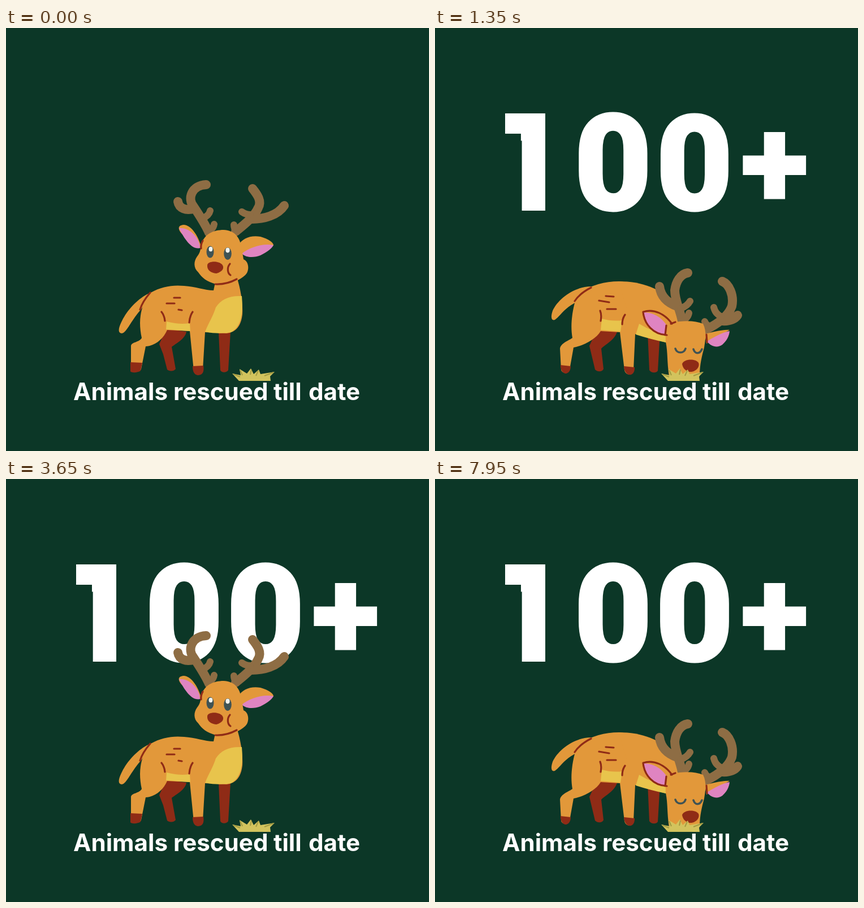
An HTML page for the animation above (8 s loop, 748 by 748 pixels).

```html
<!DOCTYPE html>
<html lang="en">
<head>
<meta charset="utf-8">
<title>Animals rescued till date</title>
<style>
html, body { margin: 0; width: 100%; height: 100%; overflow: hidden; background: #0c3727; }
svg { display: block; width: 100%; height: 100%; }
text { fill: #fff; }
.num { font-family: Roboto, Arial, sans-serif; font-weight: 900; stroke: #fff; stroke-width: 3; }
.cap { font-family: Inter, Arial, sans-serif; font-weight: 700; }
.o { fill: #e2983a; }
.y { fill: #e8c44c; }
.r { fill: #8f2b16; }
.p { fill: #df84c1; }
.e { fill: #3f5354; }
.w { fill: #f4f4ee; }
.l, .a, .z { fill: none; stroke-linecap: round; stroke-linejoin: round; }
.l { stroke: #8f2b16; stroke-width: 3.2; }
.z { stroke: #3f5354; stroke-width: 3.6; }
.a { stroke: #8e6d44; stroke-width: 16; }
.a .t { stroke-width: 12; }
</style>
</head>
<body>
<svg viewBox="0 0 748 748">
  <clipPath id="square"><path d="M124 151H195V323H152V187H124Z"/></clipPath>
  <rect width="748" height="748" fill="#0c3727"/>
  <g id="digits">
    <g>
      <!-- the 1 has a square flag -->
      <g clip-path="url(#square)">
        <text class="num" id="one">1</text>
        <rect x="124" y="151" width="71" height="36" fill="#fff"/>
      </g>
    </g>
    <text class="num">0</text>
    <text class="num">0</text>
    <text class="num">+</text>
  </g>
  <text class="cap" id="caption"><tspan x="119">Animals</tspan> <tspan x="296">rescued</tspan> <tspan x="473">till</tspan> <tspan x="535">date</tspan></text>

  <!-- standing tall -->
  <g id="bodyUp">
    <path class="r" d="M283 532L319 537C317 550 300 558 293 564L300 603C296 608 288 607 285 604L278 577L271 559ZM376 538L397 537L393 605C390 610 381 610 379 605Z"/>
    <path class="o" d="M262 466C238 472 214 498 204 520C198 532 198 540 205 540C214 538 219 520 240 496Z"/>
    <path class="o" d="M256 468C275 457 295 454 315 456C335 457 352 464 367 464L370 450L408 440C416 465 419 490 418 506C416 525 408 538 390 540L352 538L348 604C346 614 334 614 332 606L325 536L285 534C278 550 264 562 247 563L239 603C237 609 222 610 221 604L221 562C222 555 236 556 240 548C234 520 236 492 256 468Z"/>
    <path class="y" d="M417 474C394 473 380 480 371 494C366 510 358 522 352 537C370 541 388 540 398 538C414 529 420 508 417 474ZM284 519C300 523 312 524 325 522L326 536L283 533Z"/>
    <path class="r" d="M220 591L241 592L238 606C233 610 221 610 220 607ZM330 598L349 597C351 609 347 614 339 614C332 613 330 606 330 598Z"/>
    <path class="l" d="M255 468Q241 484 237 498M297 477L308 477M284 487L298 487M305 498L311 499M275 502Q280 508 281 518M330 502Q325 509 324 521"/>
  </g>
  <g id="headUp">
    <g class="a">
      <path d="M359 362C352 346 341 330 332 316C320 302 328 278 354 277M334 319C318 324 306 319 304 307M406 360C425 345 440 332 446 318C453 306 444 294 436 284M434 338C455 338 480 332 492 314"/>
      <path class="t" d="M347 337Q359 332 361 323M361 358Q367 354 368 347M417 325Q424 330 432 330M403 348Q403 355 408 361"/>
    </g>
    <path class="o" d="M346 391C342 370 328 348 314 348C303 349 304 356 311 364ZM410 385C418 372 432 366 450 369C465 373 473 380 473 384C450 400 432 404 418 400Z"/>
    <path class="p" d="M306 354C324 352 343 371 343 389C330 393 316 375 306 354ZM473 384C454 380 430 388 417 399C425 407 440 406 450 402C462 396 470 390 473 384Z"/>
    <path class="o" d="M345 385C349 365 366 357 385 357C403 358 412 368 416 385L420 409C430 413 431 430 423 437C412 447 395 455 372 453C355 449 346 441 340 432C331 424 332 412 338 404C343 398 344 392 345 385Z"/>
    <path class="l" d="M348 376Q344 383 345 390M396 417C390 424 392 434 397 437M370 453Q390 454 408 444"/>
    <ellipse class="e" cx="361" cy="396" rx="6.5" ry="10.5"/>
    <ellipse class="e" cx="392" cy="399" rx="6.8" ry="11"/>
    <ellipse class="w" cx="362" cy="391" rx="3.4" ry="4.2"/>
    <ellipse class="w" cx="392" cy="393" rx="3.6" ry="4.4"/>
    <path class="r" d="M356 419C357 412 375 411 382 418C387 424 383 431 372 434C362 433 355 428 356 419Z"/>
  </g>

  <!-- lowered body, shared by the two necks -->
  <g id="bodyLow">
    <path class="r" d="M288 530L322 537C318 552 300 560 294 567L298 603C295 609 287 608 283 604L273 562ZM376 538L398 538L394 606C391 611 382 610 379 605Z"/>
    <path class="o" d="M278 457C248 456 218 478 208 500C204 512 206 518 212 516C222 509 230 493 252 484Z"/>
    <path class="o" d="M252 470C275 455 300 448 325 448C345 449 360 457 370 462L372 540L354 541L351 605C348 616 337 614 335 605L327 538L293 536C285 550 262 562 245 565L238 604C235 612 224 611 223 604L221 567C222 557 238 552 243 548C238 520 245 490 252 470Z"/>
    <path class="r" d="M222 596L240 598C240 615 222 616 222 596ZM334 598L353 600C354 618 335 618 334 598Z"/>
  </g>
  <g id="neckMid">
    <path class="o" d="M325 448C350 452 360 462 370 462C382 460 394 456 405 448L427 495C430 520 415 540 380 543L352 541L335 500Z"/>
    <path class="y" d="M427 496C404 497 380 502 368 517L354 541C378 545 405 540 418 528C427 518 429 506 427 496Z"/>
  </g>
  <g id="neckLow">
    <path class="o" d="M325 448C365 448 400 460 427 490L440 530L412 557L354 541L340 500Z"/>
    <path class="y" d="M361 523Q385 538 409 541L408 556Q380 550 355 542Z"/>
  </g>
  <g id="marks">
    <path class="y" d="M295 514Q312 519 331 517L328 537L293 534Z"/>
    <path class="l" d="M276 459Q256 469 247 483M302 474L316 475M290 482L308 485M304 497L320 497M292 500Q295 507 293 518M336 507Q331 514 331 524"/>
  </g>
  <g id="headMid">
    <g class="a">
      <path d="M428 410C418 392 402 374 391 359C383 342 391 321 411 321M397 364C380 362 366 358 360 349M476 407C493 394 508 381 515 363C520 346 514 330 507 319M503 383C518 380 527 372 530 361"/>
      <path class="t" d="M412 374Q418 364 429 360M427 405Q433 398 433 389M488 363Q493 369 501 372M477 382Q476 392 482 399"/>
    </g>
    <path class="o" d="M368 395C385 397 402 402 414 415L408 445ZM478 428C490 413 510 408 523 411L478 458Z"/>
    <path class="p" d="M368 396C385 402 399 419 406 432L405 456C387 450 371 424 368 396ZM523 411C505 415 487 430 481 440L475 461C497 459 515 440 523 411Z"/>
    <path class="o" d="M406 440C405 420 425 403 450 402C472 404 480 420 478 440L480 460C480 472 474 478 474 490C468 502 455 508 447 505C435 498 428 493 418 490C405 483 400 470 403 455Z"/>
    <path class="l" d="M405 457C399 470 405 487 425 490M480 425L479 440"/>
    <ellipse class="e" cx="436" cy="450" rx="7" ry="11"/>
    <ellipse class="e" cx="466" cy="453" rx="6.5" ry="10"/>
    <ellipse class="w" cx="437" cy="446" rx="3.6" ry="4.5"/>
    <ellipse class="w" cx="466" cy="449" rx="3.4" ry="4.2"/>
    <path class="r" d="M444 473C448 466 464 465 471 473C470 480 460 486 455 484C449 482 444 478 444 473Z"/>
  </g>
  <g id="headLow">
    <g class="a">
      <path d="M437 518C434 500 424 482 424 464C426 448 434 435 447 433M430 493C410 486 399 474 397 457M480 533C500 523 519 509 525 492C529 472 520 453 508 448M508 518C522 519 531 514 535 508"/>
      <path class="t" d="M434 496Q446 492 451 483M440 517Q448 511 449 504M493 494Q496 506 506 510M477 519Q479 525 486 528"/>
    </g>
    <path class="o" d="M477 541C490 538 505 533 521 534L480 558Z"/>
    <path class="p" d="M521 536C508 538 494 546 481 554C488 564 500 566 508 560C516 553 520 545 521 536Z"/>
    <path class="o" d="M418 521C440 517 460 517 474 523C481 537 478 552 476 565C472 580 468 595 468 616L414 616C410 590 412 575 408 555C407 540 410 527 418 521Z"/>
    <path class="o" d="M368 502C388 496 408 506 422 521L410 544C388 543 370 525 368 502Z"/>
    <path class="p" d="M369 503C388 502 405 516 410 527L407 542C388 542 372 523 369 503Z"/>
    <path class="l" d="M410 543C386 542 370 524 368 502C388 496 407 506 419 523M409 526L407 543M417 523L425 520M480 542L481 556"/>
    <path class="z" d="M425 567C428 576 440 576 443 567M457 568C460 577 468 577 472 568"/>
    <path class="r" d="M437 594C440 585 460 584 466 592C469 600 460 609 450 608C442 606 438 601 437 594Z"/>
  </g>

  <path fill="#d2c35d" d="M400 611L415 614L413 603L426 611L433 602L438 612L447 604L450 612L475 608L467 616L468 624L412 624Z"/>
  <path fill="none" stroke="#a39a42" stroke-width="2" d="M402 612L414 617M414 605L418 614M434 604L432 613M446 606L442 615M473 609L457 615"/>
</svg>
<script>
const $ = id => document.getElementById(id);
const pen = document.createElement('canvas').getContext('2d');

// Sizes a text by its inked height or width; k picks the inked edge that sits at x.
function place(el, x, bottom, { h, w, k = 0.5 }) {
  const css = getComputedStyle(el);
  pen.font = `${css.fontWeight} 100px ${css.fontFamily}`;
  const m = pen.measureText(el.textContent);
  const left = m.actualBoundingBoxLeft, wide = left + m.actualBoundingBoxRight;
  const down = m.actualBoundingBoxDescent, tall = down + m.actualBoundingBoxAscent;
  const s = h ? h / tall : w / wide;
  el.setAttribute('font-size', 100 * s);
  el.setAttribute('x', x + s * (left - k * wide));
  el.setAttribute('y', bottom - s * down);
}

const [one, zeroA, zeroB, plus] = $('digits').children;
place($('one'), 195, 323, { h: 172, k: 1 });
place(zeroA, 315, 324.5, { h: 175 });
place(zeroB, 459, 324.5, { h: 175 });
place(plus, 600, 301, { h: 116 });
place($('caption'), 374.5, 658.5, { w: 503 });

const parts = ['bodyUp', 'headUp', 'bodyLow', 'neckMid', 'neckLow', 'marks', 'headMid', 'headLow'];
const looks = {
  up: ['bodyUp', 'headUp'],
  mid: ['bodyLow', 'neckMid', 'marks', 'headMid'],
  low: ['bodyLow', 'neckLow', 'marks', 'headLow']
};
const CYCLE = 6000;
// start time, look, head offset
const poses = [
  [0, 'up', 0, 0], [200, 'up', 6, 2], [317, 'up', 14, 6], [483, 'mid', -24, -18],
  [650, 'mid', 0, 0], [950, 'low', 6, -45], [1150, 'low', 4, -20], [1300, 'low', 0, 0],
  [2817, 'low', 4, -20], [2983, 'low', 6, -45], [3150, 'mid', 0, 0],
  [3350, 'mid', -24, -18], [3483, 'up', 14, 6], [3650, 'up', 0, 0]
];

function drawDeer(t) {
  const [, look, dx, dy] = poses.findLast(p => p[0] <= t % CYCLE);
  const used = looks[look];
  for (const id of parts) $(id).setAttribute('display', used.includes(id) ? 'inline' : 'none');
  $(used[used.length - 1]).setAttribute('transform', `translate(${dx} ${dy})`);
}

// Damped spring from 0 to 1
function spring(ms) {
  const u = ms / 315;
  return u <= 0 ? 0 : 1 - Math.exp(-1.9 * u) * Math.cos(Math.PI * u);
}

function scaleAt(el, s, x, y, dy = 0) {
  el.setAttribute('display', s > 0.001 ? 'inline' : 'none');
  el.setAttribute('transform', `translate(${x} ${y + dy}) scale(${s}) translate(${-x} ${-y})`);
}

function drawDigits(t) {
  [[one, 174], [zeroA, 315], [zeroB, 459]].forEach(([el, x], i) =>
    scaleAt(el, t > 2150 ? 1 : spring(t - 372 - 236 * i), x, 294));
  const grow = Math.min(1, Math.max(0, (t - 180) / 380));
  const settle = Math.min(1, Math.max(0, (t - 600) / 600));
  scaleAt(plus, 1 - (1 - grow) ** 3, 600, 243, 4 * (1 - settle));
}

function draw(t) {
  drawDeer(t);
  drawDigits(t);
}

const start = performance.now();
function tick() {
  draw((performance.now() - start) % 8000);
  requestAnimationFrame(tick);
}
draw(0);
requestAnimationFrame(tick);
</script>
</body>
</html>
```
